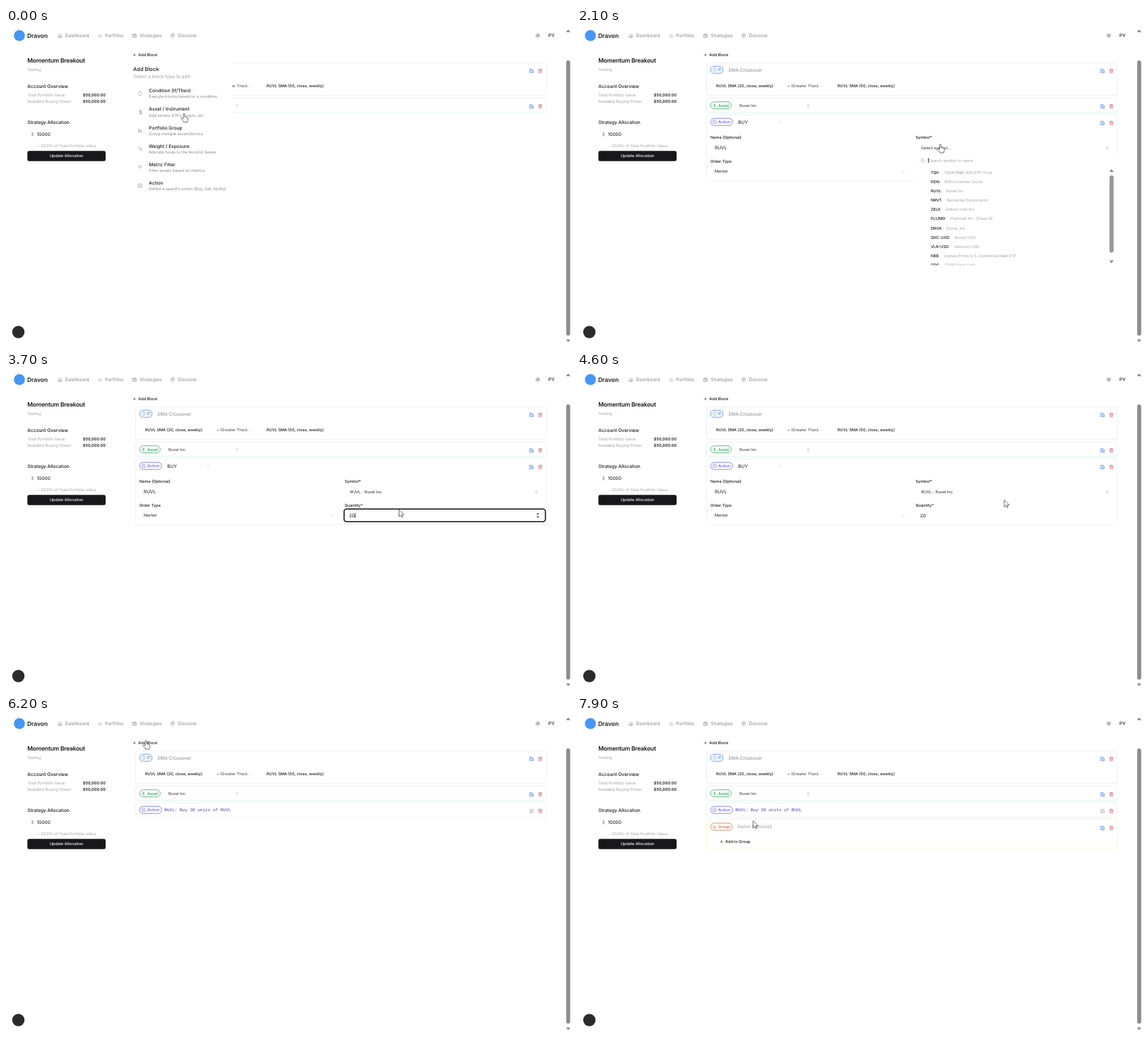
Animation, 800 px wide and 448 px high, one loop 8000 ms. Source, as an HTML page:

```html
<!DOCTYPE html>
<html lang="en">
<head>
<meta charset="utf-8">
<title>Strategy builder</title>
<style>
html, body { margin: 0; width: 100%; height: 100%; overflow: hidden; background: #fff; }
svg { display: block; width: 100vw; height: 100vh; }
text { font-family: Inter, "Open Sans", sans-serif; text-rendering: geometricPrecision; white-space: pre; }
.mono { font-family: "Liberation Mono", "DejaVu Sans Mono", monospace; }
</style>
</head>
<body>
<svg id="stage" viewBox="0 0 800 448"></svg>
<script>
const INK = '#18181b', MUTED = '#85858b', SOFT = '#a0a0a5', BLUE = '#2f7be8', RED = '#dc4a5c';
const XS = 5.6, SM = 6.56, MD = 7.5, LG = 8.44;
const LOOP = 8000;

const PATHS = {
  home: 'M3 10l9-7 9 7v11H3zM9 21v-9h6v9',
  bars: 'M5 20v-5M12 20V4M19 20V10',
  bag: 'M2 7h20v13H2zM8 20V3h8v17',
  compass: 'M12 2a10 10 0 1 0 .01 0zM16 8l-2 6-6 2 2-6z',
  sun: 'M12 8a4 4 0 1 0 .01 0zM12 1v2M12 21v2M1 12h2M21 12h2M4 4l2 2M18 18l2 2M4 20l2-2M18 6l2-2',
  plus: 'M4 12h16M12 4v16',
  save: 'M3 3h13l5 5v13H3zM7 21v-8h10v8M7 3v5h8',
  trash: 'M3 6h18M5 6v15h14V6M8 6V2h8v4M10 11v6M14 11v6',
  pencil: 'M12 3H3v18h18v-9M18 3l3 3-9 9-4 1 1-4z',
  close: 'M6 6l12 12M18 6L6 18',
  down: 'M6 9l6 6 6-6',
  updown: 'M7 15l5 5 5-5M7 9l5-5 5 5',
  search: 'M11 3a8 8 0 1 0 .01 0zM21 21l-4-4',
  ring: 'M12 2a10 10 0 1 0 .01 0z',
  chart: 'M3 3v18h18M8 17v-4M13 17V6M18 17v-7',
  percent: 'M19 5L5 19M6.5 4a2.5 2.5 0 1 0 .01 0zM17.5 15a2.5 2.5 0 1 0 .01 0z',
  filter: 'M3 6h18M7 12h10M10 18h4',
  action: 'M3 3h18v18H3zM7 8l3 3-3 3M12 15h5'
};

// Text is placed by the middle of its capitals.
const text = (x, y, s, size = XS, fill = INK, weight = 400, extra = '') =>
  `<text x="${x}" y="${y + size * .364}" font-size="${size}" fill="${fill}" font-weight="${weight}" ${extra}>${s}</text>`;
const icon = (x, y, name, color = MUTED, size = SM) =>
  `<path d="${PATHS[name]}" fill="none" stroke="${color}" stroke-width="2" stroke-linejoin="round" stroke-linecap="round"
    transform="translate(${x - size / 2} ${y - size / 2}) scale(${size / 24})"/>`;
const rect = (x, y, w, h, fill, stroke = 'none', r = 0, extra = '') =>
  `<rect x="${x}" y="${y}" width="${w}" height="${h}" rx="${r}" fill="${fill}" stroke="${stroke}" ${extra}/>`;
const group = (id, ...parts) => `<g id="${id}">${parts.join('')}</g>`;
const tri = (x, y, dir) => `<path d="M${x - 3} ${y + 2 * dir}h6l-3 ${-4 * dir}z" fill="#8a8a8a"/>`;
const block = (y, h, color) => rect(183.5, y, 581.5, h, '#fff', color, 3);
const tools = (y, first = 'save', color = BLUE) => icon(744.3, y, first, color) + icon(756.5, y, 'trash', RED);
const badge = (y, w, name, label, color) =>
  rect(189.3, y - 5, w, 10, '#fff', color, 5, 'stroke-width=".7"') +
  (name === '$' ? text(193, y, '$', XS, color) : icon(195, y, name, color, 5.6)) +
  text(200, y, label, XS, color, 500);
const focusRing = (id, x, y, w) =>
  rect(x, y, w, 18, '#fff', '#111', 3.5, `id="${id}" stroke-width="1.5"`);
const caret = id => `<rect id="${id}" width=".8" height="7" fill="#111"/>`;

const nav = [[76.5, 'home', 'Dashboard'], [133, 'bars', 'Portfolio'], [182, 'bag', 'Strategies'], [236, 'compass', 'Discover']];
const blockTypes = [
  ['ring', 'Condition (If/Then)', 'Execute blocks based on a condition'],
  ['$', 'Asset / Instrument', 'Add stocks, ETFs, crypto, etc.'],
  ['chart', 'Portfolio Group', 'Group multiple assets/blocks'],
  ['percent', 'Weight / Exposure', 'Allocate funds to the block(s) below'],
  ['filter', 'Metric Filter', 'Filter assets based on metrics'],
  ['action', 'Action', 'Define a specific action (Buy, Sell, Notify)']
];
const symbols = [
  ['TQV', 'TQVR M&amp;K 400 ETF Trust'], ['KDN', 'KDN Common Stock'], ['RUVL', 'Ruvel Inc.'],
  ['NRVT', 'Norvantel Corporation'], ['ZELK', 'Zelkori.com Inc'], ['PLUMO', 'Plumoret Inc. (Class A)'],
  ['DRVA', 'Drova, Inc'], ['QXC-USD', 'Quoxil USD'], ['VLR-USD', 'Velorium USD'],
  ['KBB', 'vLanes Prime U.S. Combined Debt ETF'], ['TQG', 'TQVR Silver Lots']
];

const header =
  `<circle cx="19" cy="10.7" r="7.8" fill="#4596f7"/>` + text(30, 11, 'Dravon', LG, INK, 600) +
  nav.map(([x, name, label]) => icon(x, 10.8, name) + text(x + 7.3, 10.8, label, SM, MUTED)).join('') +
  icon(753, 10.8, 'sun', INK) + text(768, 10.8, 'PY', SM, INK, 500);

const sidebar =
  text(30.3, 46, 'Momentum Breakout', LG, INK, 600, 'letter-spacing="-.2"') +
  text(30.3, 59, 'Testing', XS, SOFT) +
  text(30.3, 82.8, 'Account Overview', SM, INK, 500) +
  [['Total Portfolio Value:', 95], ['Available Buying Power:', 104.3]].map(([label, y]) =>
    text(30.3, y, label, XS, SOFT) + text(141, y, '$50,000.00', XS, INK, 600, 'text-anchor="end"')).join('') +
  text(30.3, 133.2, 'Strategy Allocation', SM, INK, 500) +
  text(35.5, 150.8, '$', SM, MUTED) + text(43.7, 150.8, '10000', SM) +
  text(44, 166.8, '~ 20.0% of Total Portfolio Value', XS, SOFT) +
  rect(30.3, 174.2, 110.7, 14.6, INK, 'none', 2.5) +
  text(85.7, 181.3, 'Update Allocation', XS, '#fff', 500, 'text-anchor="middle"');

const frame =
  `<circle cx="17.5" cy="431" r="8.7" fill="#2b2b2b"/>` +
  tri(796, 4, 1) + rect(793.2, 46, 5.6, 390, '#8c8c8c', 'none', 2.8) + tri(796, 443.5, -1);

const conditionAndAsset =
  icon(181.8, 38.2, 'plus', INK, 5.6) + text(187.3, 38.2, 'Add Block', XS, INK, 500) +
  block(49.5, 46, '#e9f1fb') + badge(59.2, 17.5, 'ring', 'If', BLUE) +
  text(214.3, 59.2, 'SMA Crossover', SM, MUTED) + tools(60.8) +
  text(197, 81.5, 'RUVL SMA (20, close, weekly)', XS, INK, 500) +
  text(298, 81.5, '&gt; (Greater Than)', XS, '#444') + icon(345.8, 81.7, 'down', SOFT, 4.8) +
  text(369, 81.5, 'RUVL SMA (50, close, weekly)', XS, INK, 500) +
  block(99, 20.5, '#e4f5f2') + badge(109.7, 29, '$', 'Asset', '#22a353') +
  text(230, 109.7, 'Ruvel Inc.', XS, '#333') + icon(327.3, 109.9, 'updown', MUTED, 6) + tools(111.2);

const editor = group('editor',
  block(123, 93.5, '#f0f1fc'), badge(133.2, 31, 'action', 'Action', '#5b57e8'),
  text(228.3, 133.2, 'BUY', SM), icon(286.5, 133.4, 'down', SOFT, 5.6),
  group('unsaved', tools(134.7)),
  group('editing', icon(732.3, 134.7, 'save', INK), tools(134.7, 'close', MUTED)),
  text(189, 155.3, 'Name (Optional)', XS, INK, 500), text(479.5, 155.3, 'Symbol*', XS, INK, 500),
  text(189, 188.8, 'Order Type', XS, INK, 500), text(479.5, 188.8, 'Quantity*', XS, INK, 500),
  text(195, 203, 'Market', XS, '#222'), icon(462.3, 203.2, 'down', SOFT, 5.6),
  focusRing('nameRing', 188, 160.5, 285), text(195, 169.7, '', SM, INK, 400, 'id="name"'), caret('nameCaret'),
  text(487.3, 169.7, '', XS, '#222', 400, 'id="symbol"'), icon(751, 169.8, 'updown', MUTED, 6),
  focusRing('qtyRing', 478.7, 194.2, 285), text(485.7, 203.3, '', SM, INK, 400, 'id="qty"'), caret('qtyCaret'),
  group('spinner', `<path d="M751 202l2-2.4 2 2.4zM751 204.6l2 2.4 2-2.4z" fill="#555"/>`));

const summary = group('summary',
  block(123, 20.5, '#f0f1fc'), badge(133.2, 31, 'action', 'Action', '#5b57e8'),
  text(224.3, 133.2, 'RUVL: Buy 20 units of RUVL', 6.02, '#4338a8', 400, 'class="mono"'),
  tools(134.7, 'pencil', MUTED));

const groupBlock = group('groupBlock',
  block(146.7, 42, '#fcf8cf'), badge(157, 30.5, 'chart', 'Group', '#d8622b'),
  text(227, 156.8, 'Name (optional)', SM, SOFT), tools(159),
  icon(204.5, 178.2, 'plus', INK, 5.6), text(210, 178.2, 'Add to Group', XS, INK, 500));

const dropdown = group('dropdown',
  rect(480, 179, 286, 158, '#fff'),
  icon(489.3, 187.8, 'search', MUTED, 6.2), text(498, 187.8, 'Search symbol or name...', XS, SOFT), caret('searchCaret'),
  '<clipPath id="listClip"><rect x="480" y="197" width="270" height="139.5"/></clipPath><g clip-path="url(#listClip)">',
  ...symbols.map(([code, label], i) => text(501, 205.2 + i * 13.05, `${code}<tspan dx="7" fill="${SOFT}" font-weight="400">${label}</tspan>`, XS, INK, 500)),
  '</g>',
  tri(756.8, 202, 1), rect(754, 209, 5.8, 109.5, '#999', 'none', 2.9), tri(756.8, 331.5, -1));

const popup = group('popup',
  rect(176, 46, 144.5, 191, '#fff'),
  text(180, 58.5, 'Add Block', MD, INK, 500), text(180, 68.3, 'Select a block type to add', SM, SOFT),
  ...blockTypes.map(([name, title, note], i) => {
    const y = 89 + i * 26.1;
    return (name === '$' ? text(188, y + 4, '$', MD, MUTED) : icon(190, y + 4, name, MUTED)) +
      text(202.3, y, title, SM, INK, 500) + text(202.3, y + 8.4, note, XS, MUTED);
  }));

const cursor = `<g id="cursor" fill="#fff" stroke="#333" stroke-width=".7" stroke-linejoin="round">
  <path id="arrow" d="M0 0V9.8L2.3 7.7 3.8 11 5.4 10.3 3.9 7.1H7Z"/>
  <path id="hand" d="M-1 6V.8A1 1 0 0 1 1 .8V4.4Q2.3 3.8 2.6 4.9 3.9 4.5 4.2 5.5 5.6 5.2 5.6 6.6V8.6Q5.6 10 4.7 11V12H-.6V11Q-2.4 9.4-3.6 7.3-3.9 6.2-2.8 6.1-1.9 6.2-1 7.2Z"/></g>`;

const stage = document.getElementById('stage');
stage.innerHTML = header + sidebar + conditionAndAsset + editor + summary + groupBlock + dropdown + popup + frame + cursor;

const $ = id => document.getElementById(id);
const show = (id, on) => { $(id).style.display = on ? '' : 'none'; };
const clamp = v => Math.max(0, Math.min(1, v));
const within = (t, a, b) => t >= a && t < b;

// Pointer stops: time, x, y
const stops = [
  [0, 252, 121.5], [150, 252, 121.5], [500, 248, 215], [700, 248, 215], [950, 258.5, 161.5],
  [1450, 258.5, 161.5], [1800, 514.5, 165], [2150, 514.5, 165], [2400, 530, 228], [2550, 530, 228],
  [2850, 556.5, 195.3], [3900, 556.5, 195.3], [4200, 600, 183], [4550, 600, 183], [5000, 744, 135.3],
  [5420, 744, 135.3], [5530, 732, 132], [5600, 732, 132], [5800, 480, 160], [5950, 480, 160],
  [6200, 198, 35], [6300, 198, 35], [6600, 249.3, 148.5], [LOOP, 249.3, 148.5]
];
const handTimes = [[0, 750], [1750, 2550], [4950, 5620], [6150, 6800]];

function pointerAt(t) {
  const i = stops.findIndex(s => s[0] > t);
  const [t0, x0, y0] = stops[i - 1], [t1, x1, y1] = stops[i];
  const k = (t - t0) / (t1 - t0), e = k * k * (3 - 2 * k);
  return [x0 + (x1 - x0) * e, y0 + (y1 - y0) * e];
}

function field(id, value, hint) {
  $(id).textContent = value || hint;
  $(id).setAttribute('fill', value ? INK : SOFT);
}

function blink(id, t, from, to, x, y) {
  show(id, within(t, from, to) && (t - from) % 1060 < 530);
  $(id).setAttribute('x', x);
  $(id).setAttribute('y', y);
}

function render(t) {
  const name = 'RUVL'.slice(0, Math.max(0, Math.floor((t - 1200) / 100)));
  const qty = '20'.slice(0, t < 3200 ? 0 : t < 3400 ? 1 : 2);
  const popupAlpha = t < 3000 ? 1 - clamp((t - 720) / 130)
    : clamp((t - 6250) / 120) * (1 - clamp((t - 6740) / 110));

  show('editor', within(t, 720, 5600));
  show('unsaved', t < 5100);
  show('editing', t >= 5100);
  show('summary', t >= 5600);
  show('groupBlock', t >= 7900);
  show('dropdown', within(t, 1900, 2550));
  show('popup', popupAlpha > 0);
  $('popup').setAttribute('opacity', popupAlpha);

  field('name', name, 'e.g., Buy Ruvel Stock');
  field('qty', qty, 'Units/Shares');
  $('symbol').textContent = t < 2500 ? 'Select symbol...' : 'RUVL - Ruvel Inc.';
  show('nameRing', within(t, 1100, 1900));
  show('qtyRing', within(t, 2900, 4300));
  show('spinner', within(t, 2900, 4300));

  const nameEnd = name && t < 1900 ? $('name').getComputedTextLength() : 0;
  const qtyEnd = qty && t < 4300 ? $('qty').getComputedTextLength() : 0;
  blink('nameCaret', t, 1100, 1900, 195 + nameEnd, 166.2);
  blink('searchCaret', t, 1900, 2550, 497, 184.3);
  blink('qtyCaret', t, t < 3400 ? 2900 : 3400, 4300, 485.7 + qtyEnd, 199.8);

  const hand = handTimes.some(([a, b]) => within(t, a, b));
  show('hand', hand);
  show('arrow', !hand);
  $('cursor').setAttribute('transform', `translate(${pointerAt(t)})`);
}

let start;
function tick(now) {
  start ??= now;
  render((now - start) % LOOP);
  requestAnimationFrame(tick);
}
render(0);
requestAnimationFrame(tick);
</script>
</body>
</html>
```
